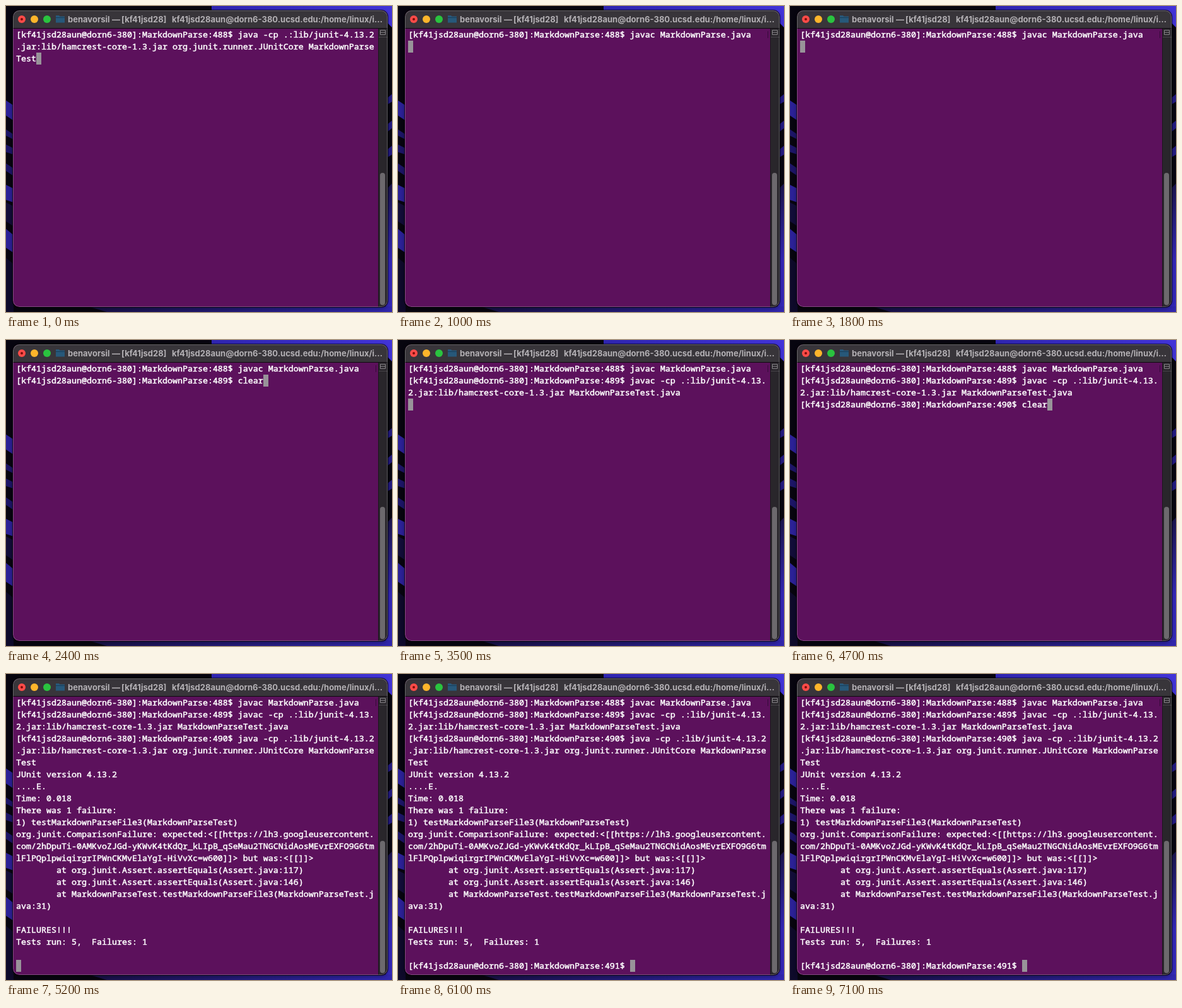
Recreate the animation shown at these times as an HTML page. Size 612 by 486 pixels, loop 7.2 s.

```html
<!DOCTYPE html>
<html lang="en">
<head>
<meta charset="utf-8">
<title>Terminal</title>
<style>
  html, body { margin: 0; width: 612px; height: 486px; overflow: hidden; background: #07050f; }
  .desk { position: absolute; inset: 0; }
  .win {
    position: absolute; left: 11px; top: 7px; width: 594px; height: 471px;
    border-radius: 10px; overflow: hidden; background: #5c115c;
    box-shadow: 0 0 0 1px rgba(0, 0, 0, .7), 0 2px 6px rgba(0, 0, 0, .4);
  }
  .win::after {
    content: ""; position: absolute; inset: 0; border-radius: 10px;
    box-shadow: inset 0 0 0 1px rgba(255, 255, 255, .24);
  }
  .bar { position: absolute; left: 0; top: 0; width: 594px; height: 28px; background: #38353a; border-bottom: 1px solid #0d090e; }
  .bar span {
    position: absolute; top: 5px; font: 700 13px/18px Inter, sans-serif;
    color: #b3b0b4; white-space: pre;
  }
  .bar svg { position: absolute; left: 0; top: 0; }
  .track { position: absolute; right: 0; top: 29px; width: 15px; height: 442px; background: #29262b; border-left: 1px solid #1c151e; box-sizing: border-box; }
  .track svg { position: absolute; left: 0; top: 0; }
  .thumb { position: absolute; left: 2px; top: 229px; width: 8px; height: 210px; border-radius: 4px; background: #6c696d; }
  #text {
    position: absolute; left: 5px; top: 29px; margin: 0; color: #fff;
    font: 500 13.333px/19px "Noto Sans Mono", "DejaVu Sans Mono", monospace;
    font-variant-ligatures: none; -webkit-text-stroke: .5px #fff;
  }
  #cursor { position: absolute; width: 8px; height: 19px; background: #989399; }
  #mark { position: absolute; left: 575px; top: 33px; width: 1px; height: 11px; background: #350b39; }
</style>
</head>
<body>
<svg class="desk" width="612" height="486">
  <defs>
    <linearGradient id="sky">
      <stop offset="0" stop-color="#2f25b0"/>
      <stop offset="1" stop-color="#4234d8"/>
    </linearGradient>
    <linearGradient id="side" x2="0" y2="1">
      <stop offset="0" stop-color="#1a144c"/>
      <stop offset=".6" stop-color="#3428b8"/>
    </linearGradient>
    <linearGradient id="floor">
      <stop offset="0" stop-color="#171044"/>
      <stop offset="1" stop-color="#3026ac"/>
    </linearGradient>
  </defs>
  <path d="M326 0H612V34L600 22L560 12H326Z" fill="url(#sky)"/>
  <path d="M0 150L12 158V182L0 174Z" fill="#2b2196"/>
  <path d="M0 196L12 204V212L0 206ZM0 220L12 226V236L0 232ZM0 250L12 258V270L0 262Z" fill="#1c1566"/>
  <path d="M0 284L12 290V312L0 308Z" fill="#2b2196"/>
  <path d="M0 312L12 318V350L0 342Z" fill="#120d38"/>
  <path d="M0 354L12 364V392L0 384Z" fill="#2b2196"/>
  <path d="M0 400L12 410V486H0Z" fill="#0e0a2a"/>
  <path d="M612 140L602 148V158L612 152ZM612 182L602 190V202L612 194ZM612 222L602 230V242L612 236Z" fill="#231a80"/>
  <path d="M612 282L602 292V486H612Z" fill="url(#side)"/>
  <path d="M160 486L130 477H612V486Z" fill="url(#floor)"/>
</svg>
<div class="win">
  <div class="bar">
    <svg width="90" height="28">
      <circle cx="14" cy="14" r="6" fill="#fe4b48"/>
      <circle cx="14" cy="14" r="2" fill="#7c0d0b"/>
      <circle cx="34" cy="14" r="6" fill="#fdb52b"/>
      <circle cx="54" cy="14" r="6" fill="#2ac33f"/>
      <path d="M68 8h5l1.5 1.5H82V19.500H68Z" fill="#27587a"/>
      <path d="M68 11.500H82" stroke="#173d58"/>
    </svg>
    <span style="left:87px">benavorsil</span>
    <span style="left:157px">—</span>
    <span style="left:172px">[kf41jsd28]</span>
    <span style="left:252px">kf41jsd28aun@dorn6-380.ucsd.edu:/home/linux/i…</span>
  </div>
  <div class="track">
    <svg width="14" height="14" fill="none" stroke="#8b888c">
      <path d="M0 13.500H14" stroke="#48444a"/>
      <path d="M2.500 2.500h8v7h-8zM3 6h7"/>
    </svg>
    <div class="thumb"></div>
  </div>
  <div id="mark"></div>
  <div id="cursor"></div>
  <pre id="text"></pre>
</div>
<script>
const LOOP = 7200, COLS = 71, CELL = 8, ROW = 19, LEFT = 5, TOP = 29;
const jars = '-cp .:lib/junit-4.13.2.jar:lib/hamcrest-core-1.3.jar ';
const build = 'javac MarkdownParse.java';
const buildTest = 'javac ' + jars + 'MarkdownParseTest.java';
const runTest = 'java ' + jars + 'org.junit.runner.JUnitCore MarkdownParseTest';
const prompt = n => `[kf41jsd28aun@dorn6-380]:MarkdownParse:${n}$ `;
const report = `JUnit version 4.13.2
....E.
Time: 0.018
There was 1 failure:
1) testMarkdownParseFile3(MarkdownParseTest)
org.junit.ComparisonFailure: expected:<[[https://lh3.googleusercontent.com/2hDpuTi-0AMKvoZJGd-yKWvK4tKdQr_kLIpB_qSeMau2TNGCNidAosMEvrEXFO9G6tmlFlPQplpwiqirgrIPWnCKMvElaYgI-HiVvXc=w600]]> but was:<[[]]>
        at org.junit.Assert.assertEquals(Assert.java:117)
        at org.junit.Assert.assertEquals(Assert.java:146)
        at MarkdownParseTest.testMarkdownParseFile3(MarkdownParseTest.java:31)

FAILURES!!!
Tests run: 5,  Failures: 1

`;

const first = prompt(488) + build + '\n';
const second = first + prompt(489) + buildTest + '\n';
const third = second + prompt(490) + runTest + '\n';

// Start time and screen content of each step
const steps = [
  [0, prompt(488) + runTest],
  [300, prompt(488) + buildTest],
  [600, prompt(488) + build],
  [900, first],
  [1900, first + prompt(489)],
  [2100, first + prompt(489) + build],
  [2300, first + prompt(489) + 'clear'],
  [2600, first + prompt(489) + runTest],
  [2900, first + prompt(489) + buildTest],
  [3200, second],
  [4200, second + prompt(490)],
  [4300, second + prompt(490) + buildTest],
  [4500, second + prompt(490) + build],
  [4600, second + prompt(490) + 'clear'],
  [4800, second + prompt(490) + runTest],
  [4900, third],
  [5100, third + report],
  [5300, third + report + prompt(491)]
];

const wrap = s => s.split('\n').flatMap(line => line.match(new RegExp(`.{1,${COLS}}`, 'g')) || ['']);
const [text, cursor, mark] = ['text', 'cursor', 'mark'].map(id => document.getElementById(id));
let shown = null;

function draw() {
  const t = performance.now() % LOOP;
  const step = steps.findLast(s => s[0] <= t);
  if (step !== shown) {
    shown = step;
    const rows = wrap(step[1]);
    text.textContent = rows.join('\n');
    cursor.style.left = LEFT + rows.at(-1).length * CELL + 'px';
    cursor.style.top = TOP + (rows.length - 1) * ROW + 'px';
    mark.hidden = !step[1].startsWith(first);
  }
  requestAnimationFrame(draw);
}
draw();
</script>
</body>
</html>
```
